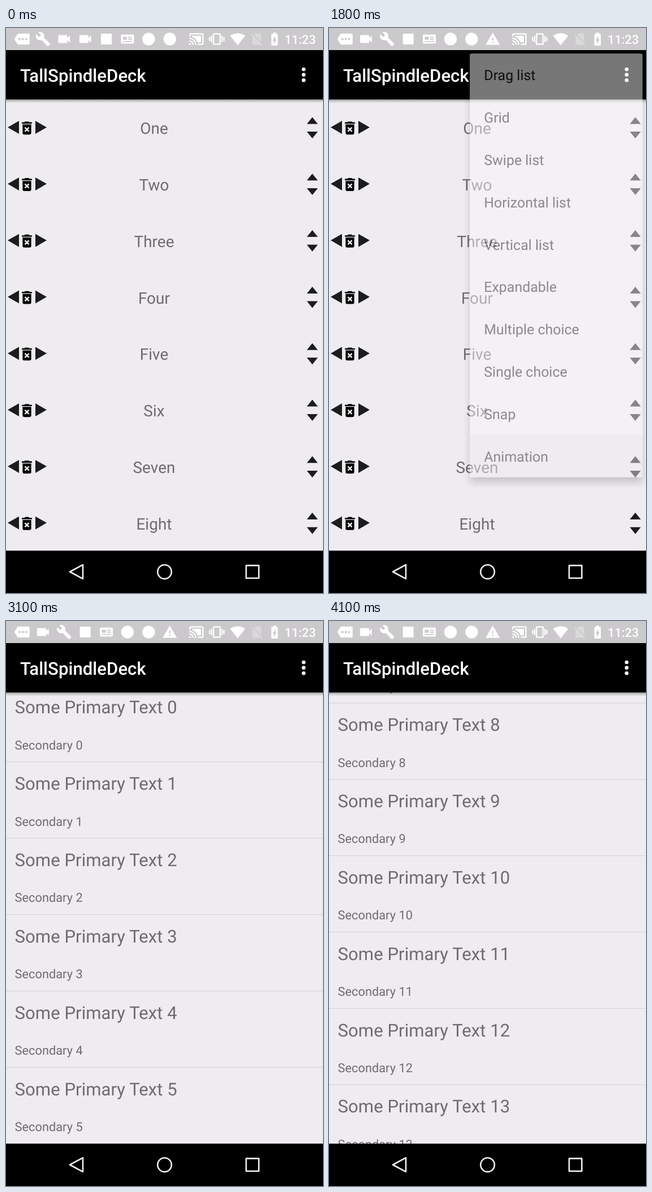
Animation of 561x998 px, one loop 5.1 s. Source, as an HTML page:

```html
<!DOCTYPE html>
<html lang="en">
<head>
<meta charset="utf-8">
<title>List demo</title>
<style>
  html, body { margin: 0; width: 100%; height: 100%; overflow: hidden; background: #000; }
  svg { display: block; }
  text { font-family: Roboto, "Noto Sans", sans-serif; text-rendering: geometricPrecision; }
  .title { font-size: 31.17px; font-weight: 500; fill: #fff; }
  .clock { font-size: 21.8px; font-weight: 500; fill: #fff; }
  .word { font-size: 28.05px; fill: #6e6c6f; text-anchor: middle; }
  .primary { font-size: 31.17px; fill: #6e6c6f; }
  .secondary { font-size: 21.8px; fill: #6e6c6f; }
  .option { font-size: 24.93px; fill: #201f21; }
  .nav { fill: none; stroke: #f0f0f0; stroke-width: 2.6; stroke-linejoin: round; }
  #shadow { fill: #faf8fb; filter: drop-shadow(0 9px 7px rgba(0, 0, 0, .36)); }
</style>
</head>
<body>
<svg id="stage" width="100%" height="100%" viewBox="0 0 561 998">
  <defs>
    <linearGradient id="fade" x1="0" y1="0" x2="0" y2="1">
      <stop offset="0" stop-opacity=".36"/>
      <stop offset=".5" stop-opacity=".13"/>
      <stop offset="1" stop-opacity="0"/>
    </linearGradient>
  </defs>

  <rect width="561" height="998" fill="#eeecef"/>
  <g id="words"></g>
  <g id="rows"></g>

  <rect y="126" width="561" height="7" fill="url(#fade)"/>
  <rect y="39" width="561" height="87.2"/>
  <text class="title" x="24.9" y="94.9">TallSpindleDeck</text>
  <g fill="#fff">
    <circle cx="526.8" cy="73" r="3.3"/>
    <circle cx="526.8" cy="82.6" r="3.3"/>
    <circle cx="526.8" cy="92.2" r="3.3"/>
  </g>

  <rect width="561" height="39" fill="#cbc9cb"/>
  <g id="before" fill="#fff"></g>
  <g id="after" fill="#fff"></g>
  <g id="system" fill="#fff"></g>
  <text class="clock" x="493" y="27.6">11:23</text>

  <rect y="923.2" width="561" height="75"/>
  <g class="nav">
    <path d="M113 960.5L136 948.2V972.8Z"/>
    <circle cx="280.6" cy="960.6" r="12.3"/>
    <rect x="425" y="949.4" width="22.4" height="22.4"/>
  </g>

  <g id="popup">
    <rect id="shadow" rx="3"/>
    <svg id="panel" overflow="hidden">
      <g id="options"></g>
    </svg>
  </g>
</svg>

<script>
const LOOP = 5100, STEP = 100;
const TOP = 126.2, WORD_PITCH = 99.8, ROW_PITCH = 134.85;
const MENU = { x: 249.3, y: 45.2, w: 305.4, h: 748.4 };
const ANCHOR = { x: 527, y: 82.6 };
const SLIDE = 280.5, SLIDE_TIME = 400;

const $ = id => document.getElementById(id);

function add(parent, tag, attrs, text) {
  const el = document.createElementNS("http://www.w3.org/2000/svg", tag);
  for (const key in attrs) el.setAttribute(key, attrs[key]);
  if (text) el.textContent = text;
  return parent.appendChild(el);
}

function set(el, attrs) {
  for (const key in attrs) el.setAttribute(key, attrs[key]);
}

// Icons on a 24 unit grid
const ICONS = {
  more: "M22.5 3.5H7Q5.7 3.5 5 4.6L.3 12 5 19.4Q5.7 20.5 7 20.5H22.5Q24 20.5 24 19V5Q24 3.5 22.5 3.5ZM7 10.5h3v3H7zM12 10.5h3v3h-3zM17 10.5h3v3h-3z",
  cam: "M17 10.5V7c0-.55-.45-1-1-1H4c-.55 0-1 .45-1 1v10c0 .55.45 1 1 1h12c.55 0 1-.45 1-1v-3.5l4 4v-11l-4 4z",
  wrench: "M22.7 19l-9.1-9.1c.9-2.3.4-5-1.5-6.9-2-2-5-2.4-7.4-1.3L9 6 6 9 1.6 4.7C.4 7.1.9 10.1 2.9 12.1c1.9 1.9 4.6 2.4 6.9 1.5l9.1 9.1c.4.4 1 .4 1.4 0l2.3-2.3c.5-.4.5-1.1.1-1.4z",
  square: "M3.7 3.7H20.3V20.3H3.7z",
  card: "M3.5 5h17Q22 5 22 6.5v11q0 1.5-1.5 1.5h-17Q2 19 2 17.5v-11Q2 5 3.5 5ZM5 8.5h6v4.5H5zM13 8.5h6v1.6h-6zM13 11.4h6V13h-6zM5 15h14v1.5H5z",
  disc: "M2.3 12a9.7 9.7 0 1 0 19.4 0a9.7 9.7 0 1 0-19.4 0z",
  warn: "M1 21h22L12 2 1 21zm12-3h-2v-2h2v2zm0-4h-2v-4h2v4z",
  cast: "M1 18v3h3c0-1.66-1.34-3-3-3zm0-4v2c2.76 0 5 2.24 5 5h2c0-3.87-3.13-7-7-7zm18-7H5v1.63c3.96 1.28 7.09 4.41 8.37 8.37H19V7zM1 10v2c4.97 0 9 4.03 9 9h2c0-6.08-4.93-11-11-11zm20-7H3c-1.1 0-2 .9-2 2v3h2V5h18v14h-7v2h7c1.1 0 2-.9 2-2V5c0-1.1-.9-2-2-2z",
  vibrate: "M0 15h2V9H0v6zm3 2h2V7H3v10zm19-8v6h2V9h-2zm-3 8h2V7h-2v10zM16.5 3h-9C6.67 3 6 3.67 6 4.5v15c0 .83.67 1.5 1.5 1.5h9c.83 0 1.5-.67 1.5-1.5v-15c0-.83-.67-1.5-1.5-1.5zM16 19H8V5h8v14z",
  wifi: "M12 21.5L23.64 7c-.45-.34-4.93-4-11.64-4C5.28 3 .81 6.66.36 7z",
  noSim: "M19 5c0-1.1-.9-2-2-2h-7L7.66 5.34 19 16.68zM3.65 3.88L2.38 5.15 5 7.77V19c0 1.1.9 2 2 2h10c.35 0 .67-.1.96-.26l1.88 1.88 1.27-1.27z",
  battery: "M15.67 4H14V2h-4v2H8.33C7.6 4 7 4.6 7 5.33v15.33C7 21.4 7.6 22 8.33 22h7.33c.74 0 1.34-.6 1.34-1.33V5.33C17 4.6 16.4 4 15.67 4zM11 20v-5.5H9L13 7v5.5h2L11 20z",
  bin: "M6 19c0 1.1.9 2 2 2h8c1.1 0 2-.9 2-2V7H6v12zm2.46-7.12l1.41-1.41L12 12.59l2.12-2.12 1.41 1.41L13.41 14l2.12 2.12-1.41 1.41L12 15.41l-2.12 2.12-1.41-1.41L10.59 14l-2.13-2.12zM15.5 4l-1-1h-5l-1 1H5v2h14V4z"
};

function icon(parent, name, x, y, scale = 1.15, opacity = 1) {
  add(parent, "path", {
    d: ICONS[name], opacity, "fill-rule": "evenodd",
    transform: `translate(${x} ${y}) scale(${scale}) translate(-12 -12)`
  });
}

function tray(id, names) {
  names.split(" ").forEach((name, i) => icon($(id), name, 28 + 37.4 * i, 19.5));
}
tray("before", "more wrench cam cam square card disc disc");
tray("after", "more cam wrench square card disc disc warn");
icon($("system"), "cast", 337, 19.5);
icon($("system"), "vibrate", 373, 19.5);
icon($("system"), "wifi", 410, 19.5);
icon($("system"), "noSim", 444, 19.5, 1.1, .3);
icon($("system"), "battery", 475.3, 19.5);

"One Two Three Four Five Six Seven Eight".split(" ").forEach((word, i) => {
  const y = TOP + WORD_PITCH * (i + .5);
  const g = add($("words"), "g", { transform: `translate(0 ${y})` });
  add(g, "path", {
    fill: "#1c1b1d",
    d: "M3 -.6L23 -12V11ZM72 -.6L52 -12V11ZM532.4 -6.6H551.8L542.1 -18.6ZM532.4 7H551.8L542.1 19Z"
  });
  icon(g, "bin", 37, .6, 1.27);
  add(g, "text", { class: "word", x: 262, y: 11 }, word);
});

const options = ["Drag list", "Grid", "Swipe list", "Horizontal list", "Vertical list",
  "Expandable", "Multiple choice", "Single choice", "Snap", "Animation"];
const optionPitch = MENU.h / options.length;
add($("options"), "rect", { width: MENU.w, height: MENU.h, rx: 3, fill: "#faf8fb" });
const pressed = add($("options"), "rect", {
  y: MENU.h - optionPitch, width: MENU.w, height: optionPitch, fill: "#000", opacity: .04
});
options.forEach((label, i) => add($("options"), "text",
  { class: "option", x: 25, y: optionPitch * (i + .5) + 9.6 }, label));

// Moment each later row enters during the fling
const ENTER = [3167, 3218, 3272, 3351, 3401, 3500, 3550, 3655];
const rows = Array.from({ length: 14 }, (_, i) => {
  const y = TOP + ROW_PITCH * i;
  const g = add($("rows"), "g");
  add(g, "rect", { y: y + ROW_PITCH - .6, width: 561, height: 1, fill: "#d2d0d3" });
  const body = add(g, "g");
  add(body, "text", { class: "primary", x: 15.6, y: y + 49.2 }, "Some Primary Text " + i);
  add(body, "text", { class: "secondary", x: 15.6, y: y + 112.5 }, "Secondary " + i);
  return { body, start: i < 6 ? 1880 : ENTER[i - 6] };
});

const clamp = v => Math.min(1, Math.max(0, v));
const mix = (a, b, p) => a + (b - a) * p;
const smooth = p => (1 - Math.cos(Math.PI * clamp(p))) / 2;

// [time, offset]: drag, then a fling that slows down
const SCROLL = [[3000, 0], [3100, 12], [3200, 130], [3300, 441], [3500, 740], [3600, 880],
  [3700, 991], [3800, 1035], [3900, 1052], [4100, 1060]];

function scrollAt(t) {
  const k = SCROLL.findIndex(point => point[0] > t);
  if (k === 0) return 0;
  if (k < 0) return SCROLL[SCROLL.length - 1][1];
  const [t0, s0] = SCROLL[k - 1], [t1, s1] = SCROLL[k];
  return mix(s0, s1, (t - t0) / (t1 - t0));
}

const show = (id, on) => $(id).setAttribute("display", on ? "inline" : "none");

function drawMenu(t) {
  const open = t >= 600 && t < 1900;
  show("popup", open);
  if (!open) return;
  const p = 1 - (1 - clamp((t - 560) / 300)) ** 2;
  const width = MENU.w * p, height = MENU.h * p;
  const box = {
    x: mix(ANCHOR.x, MENU.x + MENU.w / 2, p) - width / 2,
    y: mix(ANCHOR.y, MENU.y + MENU.h / 2, p) - height / 2,
    width, height
  };
  set($("shadow"), box);
  set($("panel"), box);
  set($("options"), { transform: `translate(${(width - MENU.w) / 2} ${(height - MENU.h) / 2})` });
  const leaving = t >= 1800;
  set($("popup"), { opacity: leaving ? .48 : clamp((t - 560) / 100) });
  set(pressed, { display: leaving ? "inline" : "none" });
}

function drawRows(t) {
  set($("rows"), { transform: `translate(0 ${-scrollAt(t)})` });
  for (const { body, start } of rows) {
    const p = smooth((t - start) / SLIDE_TIME);
    set(body, { opacity: p, transform: `translate(${(p - 1) * SLIDE} 0)` });
  }
}

function draw(time) {
  const t = Math.floor((time % LOOP) / STEP) * STEP;
  show("before", t < 200);
  show("after", t >= 200);
  show("words", t < 1900);
  show("rows", t >= 1900);
  drawMenu(t);
  drawRows(t);
}

const origin = performance.now();
function tick() {
  draw(performance.now() - origin);
  requestAnimationFrame(tick);
}
tick();
</script>
</body>
</html>
```
